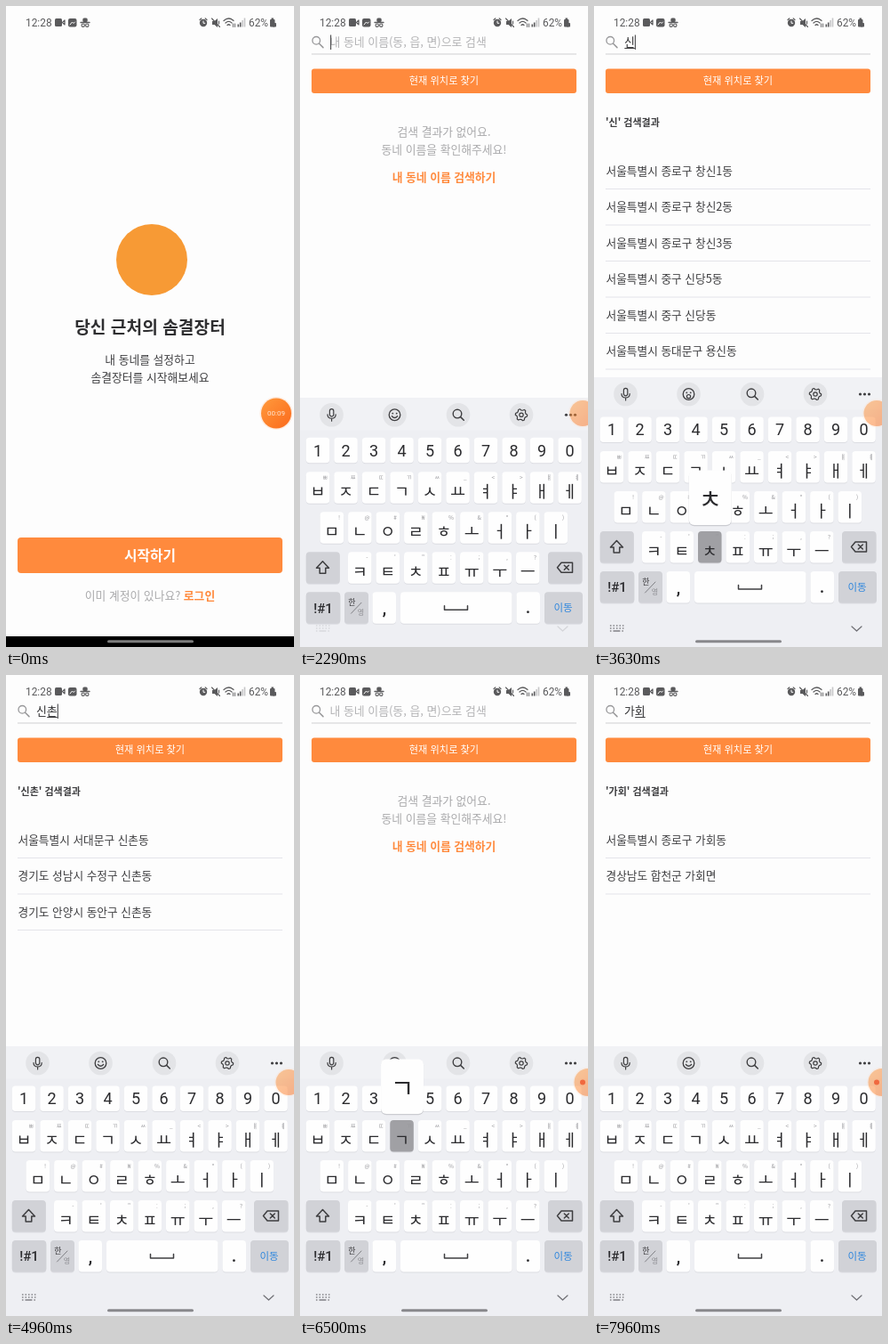
These frames come from a looping animation (324x720 px, 8000 ms). An HTML page:

```html
<!DOCTYPE html>
<html lang="ko">
<head>
<meta charset="utf-8">
<title>동네 검색</title>
<style>
  html, body { margin: 0; width: 100%; height: 100%; overflow: hidden; background: #fdfdfd; }
  svg { display: block; width: 100vw; height: 100vh; }
  text { font-family: 'Noto Sans CJK KR', 'Noto Sans KR', 'Noto Sans CJK', sans-serif; white-space: pre; }
  text.latin { font-family: Roboto, 'Noto Sans', sans-serif; }
</style>
</head>
<body>
<svg id="stage" viewBox="0 0 324 720"></svg>
<script>
const NS = 'http://www.w3.org/2000/svg';
const LOOP = 8000;
const PAPER = '#fdfdfd', INK = '#3e3e40', MUTED = '#a9a9ab', ORANGE = '#ff8a3d', BOARD = '#eeeff3';
const KEY = '#fefefe', KEY_INK = '#2b2b2e', DARK_KEY = '#d1d2d7', PRESSED = '#a0a0a4', SHADOW = '#dcdde2';
const stage = document.getElementById('stage');

function el(parent, tag, attrs = {}) {
  const node = document.createElementNS(NS, tag);
  set(node, attrs);
  return parent.appendChild(node);
}
function set(node, attrs) {
  for (const name in attrs) node.setAttribute(name, attrs[name]);
}
const group = parent => el(parent, 'g');
const box = (parent, x, y, width, height, fill, rx = 0) => el(parent, 'rect', { x, y, width, height, fill, rx });
const disc = (parent, cx, cy, r, fill) => el(parent, 'circle', { cx, cy, r, fill });
const ring = (parent, cx, cy, r, stroke, width) => el(parent, 'circle', {
  cx, cy, r, stroke, fill: 'none', 'stroke-width': width });
const line = (parent, d, stroke = INK, width = 1.3) => el(parent, 'path', {
  d, stroke, fill: 'none', 'stroke-width': width, 'stroke-linecap': 'round', 'stroke-linejoin': 'round' });

// y is the vertical middle of the glyphs
function label(parent, str, x, y, size, fill = INK, opts = {}) {
  const node = el(parent, 'text', {
    x, y: y + size * (opts.latin ? 0.355 : 0.38), fill, 'font-size': size,
    'font-weight': opts.weight || 400, 'text-anchor': opts.anchor || 'middle' });
  if (opts.latin) node.setAttribute('class', 'latin');
  node.textContent = str;
  return node;
}
const leftLabel = (parent, str, x, y, size, fill, opts = {}) =>
  label(parent, str, x, y, size, fill, { ...opts, anchor: 'start' });

const clamp = v => Math.min(1, Math.max(0, v));
const progress = (t, from, to) => clamp((t - from) / (to - from));
const show = (node, on) => set(node, { visibility: on ? 'visible' : 'hidden' });
const latest = (steps, t) => steps.reduce((best, step) => step[0] <= t ? step : best);

function tween(frames, t) {
  let i = 0;
  while (i < frames.length - 2 && t >= frames[i + 1][0]) i++;
  const [a, b] = [frames[i], frames[i + 1]];
  const p = progress(t, a[0], b[0]);
  return a.slice(1).map((v, k) => v + (b[k + 1] - v) * p);
}

// Timeline
const TYPED = [[0, ''], [2130, ''], [2960, 'ㅅ'], [3180, '시'], [3420, '신'], [3680, '신ㅊ'], [3820, '신초'],
  [3955, '신촌'], [5500, '신초'], [5580, '신'], [5690, '시'], [5785, ''],
  [6590, 'ㄱ'], [6770, '가'], [6980, '갛'], [7200, '가호'], [7455, '가회']];
const RESULTS = [[0, ''], [3540, '신'], [3790, ''], [4120, '신촌'], [5570, ''], [5650, '신'], [5760, ''],
  [6860, '가'], [7080, ''], [7495, '가회']];
const PRESSES = [[2870, 2980, 'ㅅ'], [3100, 3210, 'ㅣ'], [3340, 3450, 'ㄴ'], [3590, 3700, 'ㅊ'], [3740, 3840, 'ㅗ'],
  [3880, 3990, 'ㄴ'], [5460, 5800, '⌫'], [6490, 6600, 'ㄱ'], [6690, 6790, 'ㅏ'], [6890, 7000, 'ㅎ'],
  [7110, 7220, 'ㅗ'], [7330, 7470, 'ㅣ']];
const BUBBLE = [[0, 304, 17, 1], [1170, 304, 17, 1], [1330, 306, 16.5, .55], [1880, 318, 14.5, .5],
  [5210, 318, 14.5, .5], [5290, 324, 15.5, .5], [LOOP, 324, 15.5, .5]];
const inSeoul = (...places) => places.map(place => '서울특별시 ' + place);
const PLACES = {
  '신': inSeoul('종로구 창신1동', '종로구 창신2동', '종로구 창신3동', '중구 신당5동', '중구 신당동', '동대문구 용신동'),
  '신촌': [...inSeoul('서대문구 신촌동'), '경기도 성남시 수정구 신촌동', '경기도 안양시 동안구 신촌동'],
  '가': inSeoul('종로구 가회동', '종로구 종로1.2.3.4가동', '종로구 종로5.6가동', '성동구 성수1가1동', '성동구 성수1가2동', '성동구 성수2가1동'),
  '가회': [...inSeoul('종로구 가회동'), '경상남도 합천군 가회면']
};

box(stage, 0, 0, 324, 720, PAPER);

// Welcome screen
const welcome = group(stage);
disc(welcome, 164, 285, 40, '#f79a35');
label(welcome, '당신 근처의 솜결장터', 162, 361, 19.2, '#2f2f31', { weight: 700 });
label(welcome, '내 동네를 설정하고', 162, 397, 12.8);
label(welcome, '솜결장터를 시작해보세요', 162, 417.5, 12.8);
const startButton = group(welcome);
box(startButton, 13, 597, 298, 40, ORANGE, 4);
label(startButton, '시작하기', 162, 616.5, 15.8, '#fff', { weight: 700 });
const signIn = label(welcome, '이미 계정이 있나요? ', 162, 662, 12.8, MUTED);
const signInLink = el(signIn, 'tspan', { fill: ORANGE, 'font-weight': 700 });
signInLink.textContent = '로그인';

// Search screen
const search = group(stage);
box(search, 0, 28, 324, 680, PAPER);
ring(search, 18.3, 38.8, 4.3, '#98989a', 1.3);
line(search, 'M21.6 42.2 L26 46.6', '#98989a', 1.5);
const placeholder = leftLabel(search, '내 동네 이름(동, 읍, 면)으로 검색', 33.5, 40.5, 12.9, '#b4b4b6');
const query = leftLabel(search, '', 34, 40.5, 12.9, '#2f2f31', { weight: 500 });
const composing = box(search, 0, 47, 11.5, 1, INK);
const caret = box(search, 34, 32.5, 1.2, 16.5, '#555557');
box(search, 13, 53.5, 298, 1, '#cfcfd2');
box(search, 13, 70.5, 298, 27.5, ORANGE, 3);
label(search, '현재 위치로 찾기', 162, 84, 11.2, '#fff');
const empty = group(search);
label(empty, '검색 결과가 없어요.', 162, 141.5, 12.8, MUTED);
label(empty, '동네 이름을 확인해주세요!', 162, 161.5, 12.8, MUTED);
label(empty, '내 동네 이름 검색하기', 162, 192, 12.8, ORANGE, { weight: 700 });

const lists = {};
for (const word in PLACES) {
  const list = lists[word] = group(search);
  leftLabel(list, `'${word}' 검색결과`, 13, 131, 11, INK, { weight: 700 });
  PLACES[word].forEach((place, i) => {
    leftLabel(list, place, 13.5, 185 + i * 40.5, 12.7);
    box(list, 13, 205 + i * 40.5, 298, 1, '#e4e4ea');
  });
}

// Status bar
const status = group(stage);
const GREY = '#5a5a5c';
leftLabel(status, '12:28', 22, 18.5, 11.9, GREY, { latin: true });
box(status, 55, 14, 8, 9, GREY, 1.5);
line(status, 'M63.5 18.5 L66 16 V21 Z', GREY, 1.2);
box(status, 70, 14, 9.5, 9.5, GREY, 2);
line(status, 'M72 21 L74.5 18 L76 19.5 L77.5 18', PAPER, 1);
line(status, 'M84 18.5 H94', GREY, 1.3);
box(status, 86.3, 13.5, 5.4, 4.5, GREY, 1.5);
for (const x of [86.7, 91.3]) ring(status, x, 21.7, 1.7, GREY, 1.1);
disc(status, 222, 19, 4.2, GREY);
line(status, 'M222 17 V19.3 H223.8', PAPER, 1);
line(status, 'M218 15.5 L219.8 14 M226 15.5 L224.2 14', GREY, 1.2);
el(status, 'path', { d: 'M232 17 h2.5 l3.5 -3 v10 l-3.5 -3 h-2.5 z', fill: GREY });
line(status, 'M231.5 14 L240.5 23.5 M239.5 17 V20', GREY, 1.1);
line(status, 'M245 16.5 Q250.5 11.5 256 16.5 M247 19 Q250.5 15.8 254 19 M249 21.5 Q250.5 20 252 21.5', GREY, 1.2);
line(status, 'M255.5 20 V23.5 M257.5 20 V23.5', GREY, .9);
[3, 5, 7.5, 10].forEach((h, i) => box(status, 260.5 + i * 2.4, 23.5 - h, 1.6, h, i < 2 ? GREY : '#c6c6c8'));
leftLabel(status, '62%', 273, 18.5, 11.9, GREY, { latin: true });
box(status, 297, 15, 5.5, 8.5, GREY, 1);
box(status, 298.5, 13.5, 2.5, 2, GREY);
box(status, 300, 19, 4, 4.5, GREY, .8);

// System navigation bar
box(stage, 0, 708, 324, 12, '#000');
box(stage, 114, 712.2, 97, 3, '#7c7c7c', 1.5);

// Keyboard
const board = group(stage);
box(board, 0, 417, 324, 620, BOARD);
box(board, 0, 417, 324, 36.5, '#f1f2f5');
for (const x of [35.5, 106.5, 178, 249]) disc(board, x, 436, 13.3, '#e3e4e7');
el(board, 'rect', { x: 33.4, y: 429.3, width: 4.4, height: 8.5, rx: 2.2, fill: 'none', stroke: INK, 'stroke-width': 1.2 });
line(board, 'M31 435.5 Q31 440 35.6 440 Q40.2 440 40.2 435.5 M35.6 440 V443', INK, 1.2);
ring(board, 106.5, 436, 6.3, INK, 1.3);
for (const x of [104.3, 108.7]) disc(board, x, 434.3, .9, INK);
const smile = line(board, 'M103.4 437.5 Q106.5 441 109.6 437.5');
const openMouth = ring(board, 106.5, 438.6, 2.1, INK, 1.2);
ring(board, 177, 434.8, 4.8, INK, 1.4);
line(board, 'M180.6 438.4 L184.3 442', INK, 1.5);
const gear = Array.from({ length: 24 }, (_, i) => {
  const a = i * Math.PI / 12, r = i % 4 < 2 ? 6.7 : 5.2;
  return (249 + r * Math.cos(a)).toFixed(1) + ' ' + (436 + r * Math.sin(a)).toFixed(1);
});
line(board, 'M' + gear.join('L') + 'Z', INK, 1.2);
ring(board, 249, 436, 2.2, INK, 1.2);
for (const x of [299.5, 304.5, 309.5]) disc(board, x, 436, 1.6, INK);

const keys = {};
function addKey(name, x, y, w, h, fill) {
  box(board, x, y + 1, w, h, SHADOW, 4);
  keys[name] = { x, y, w, fill, face: box(board, x, y, w, h, fill, 4) };
}
function addRow(letters, hints, x, y) {
  [...letters].forEach((letter, i) => {
    const left = x + i * 31.5;
    addKey(letter, left, y, 26.5, 35.5, KEY);
    label(board, letter, left + 13.2, y + 22, 18.5, KEY_INK, { weight: 500 });
    label(board, hints[i], left + 21.5, y + 6.5, 6.5, '#98989c');
  });
}
[...'1234567890'].forEach((digit, i) => {
  addKey(digit, 6.8 + i * 31.5, 461.5, 26.5, 28.5, KEY);
  label(board, digit, 20 + i * 31.5, 476, 18, KEY_INK, { latin: true });
});
addRow('ㅂㅈㄷㄱㅅㅛㅕㅑㅐㅔ', 'ㅃㅉㄸㄲㅆ_<>ㅒㅖ', 6.8, 500);
addRow('ㅁㄴㅇㄹㅎㅗㅓㅏㅣ', '!@#₩%&*()', 22.6, 545);
addRow('ㅋㅌㅊㅍㅠㅜㅡ', '-\'":;,?', 54, 590);
addKey('⇧', 6.8, 590, 38, 35.5, DARK_KEY);
line(board, 'M25.5 600.5 L32.5 608 H28.8 V614 H22.2 V608 H18.5 Z', INK, 1.5);
addKey('⌫', 279, 590, 38.5, 35.5, DARK_KEY);
line(board, 'M289.5 607.5 L294 602 H306.5 V613 H294 Z M297.3 605 L302.3 610 M302.3 605 L297.3 610', INK, 1.5);
addKey('!#1', 6.8, 635, 38.5, 35.5, DARK_KEY);
label(board, '!#1', 26, 653, 15, KEY_INK, { latin: true, weight: 500 });
addKey('한영', 50, 635, 27, 35.5, DARK_KEY);
label(board, '한', 58.5, 646.5, 9, INK);
label(board, '영', 68.5, 657.5, 8, '#8f8f94');
line(board, 'M57.5 659 L69 647', '#77777b', .9);
addKey(',', 81.5, 635, 26.5, 35.5, KEY);
label(board, ',', 95, 653, 20, KEY_INK, { latin: true, weight: 500 });
addKey(' ', 113, 635, 125.5, 35.5, KEY);
line(board, 'M162.5 650.5 V655 H188.5 V650.5', INK, 1.5);
addKey('.', 243.5, 635, 26.5, 35.5, KEY);
label(board, '.', 256.5, 652, 20, KEY_INK, { latin: true, weight: 500 });
addKey('이동', 275, 635, 43, 35.5, DARK_KEY);
label(board, '이동', 296, 652.5, 11.5, '#2f86dd');

const popup = group(board);
box(popup, -24, .7, 48, 62, '#cbccd1', 6);
box(popup, -24, 0, 48, 61.5, KEY, 6);
const popupLetter = label(popup, '', 0, 32.5, 29, KEY_INK, { weight: 500 });

const boardFooter = group(stage);
for (let row = 0; row < 3; row++) {
  line(boardFooter, `M18.5 ${696 + row * 3} H33`, '#808085', 1.3).setAttribute('stroke-dasharray', row < 2 ? '.6 2.9' : '.6 2.9 7 2.9');
}
line(boardFooter, 'M290 697 L295.5 702 L301 697', '#6f6f74', 1.2);
const boardHandle = box(stage, 114, 712.2, 97, 3, '#88888c', 1.5);

// Recorder bubble
const shade = el(el(stage, 'defs'), 'linearGradient', { id: 'shade', x2: 1, y2: 1 });
el(shade, 'stop', { 'stop-color': '#ff9a3c' });
el(shade, 'stop', { offset: 1, 'stop-color': '#fb6a1c' });
const bubble = group(stage);
const halo = disc(bubble, 0, 0, 1, '#ffd9c0');
const bubbleFace = disc(bubble, 0, 0, 1, 'url(#shade)');
const timer = label(bubble, '00:09', 304, 457.5, 8, '#ffe6d2', { latin: true });
const recordDot = disc(stage, 318, 457.5, 3, '#f0693f');

function drawInput(t) {
  const [changed, text] = latest(TYPED, t);
  const end = 34 + text.length * 11.85;
  query.textContent = text;
  show(placeholder, !text);
  show(composing, text);
  set(composing, { x: end - 11.5 });
  set(caret, { x: end });
  show(caret, t >= 2130 && Math.floor((t - changed) / 500) % 2 === 0);

  const word = latest(RESULTS, t)[1];
  show(empty, !word);
  for (const name in lists) show(lists[name], name === word);
}

function drawKeyboard(t) {
  const rest = 1 - progress(t, 2130, 2410);
  set(board, { transform: `translate(0 ${303 * rest ** 3})` });
  set(board, { display: t > 2130 ? 'inline' : 'none' });
  set(boardFooter, { opacity: progress(t, 2250, 2450) });
  set(boardHandle, { opacity: progress(t, 2300, 2450) });

  const press = PRESSES.find(([from, to]) => t >= from && t < to);
  for (const name in keys) set(keys[name].face, { fill: press && press[2] === name ? PRESSED : keys[name].fill });
  const bubbled = press && press[2] !== '⌫';
  show(popup, bubbled);
  if (bubbled) {
    const key = keys[press[2]];
    popupLetter.textContent = press[2];
    set(popup, { transform: `translate(${key.x + key.w / 2 + .5} ${key.y - 68.5})` });
  }
  const open = t >= 3300 && t < 4460;
  show(smile, !open);
  show(openMouth, open);
}

function drawBubble(t) {
  const [cx, r, opacity] = tween(BUBBLE, t);
  set(halo, { cx, cy: 457.5, r: r + 1.5, opacity: .5 });
  set(bubbleFace, { cx, cy: 457.5, r });
  set(bubble, { opacity });
  set(timer, { x: cx, opacity: 1 - progress(t, 1170, 1300) });
  timer.textContent = t < 600 ? '00:09' : '00:10';
  set(recordDot, { opacity: progress(t, 5210, 5290) });
}

function draw(t) {
  const press = progress(t, 40, 140) - progress(t, 140, 290);
  const enter = progress(t, 460, 920);
  set(startButton, { opacity: 1 - .55 * press });
  set(search, { opacity: 1 - (1 - enter) ** 2 });
  show(welcome, enter < 1);
  drawInput(t);
  drawKeyboard(t);
  drawBubble(t);
}

const began = performance.now();
function tick() {
  draw((performance.now() - began) % LOOP);
  requestAnimationFrame(tick);
}
tick();
</script>
</body>
</html>
```
